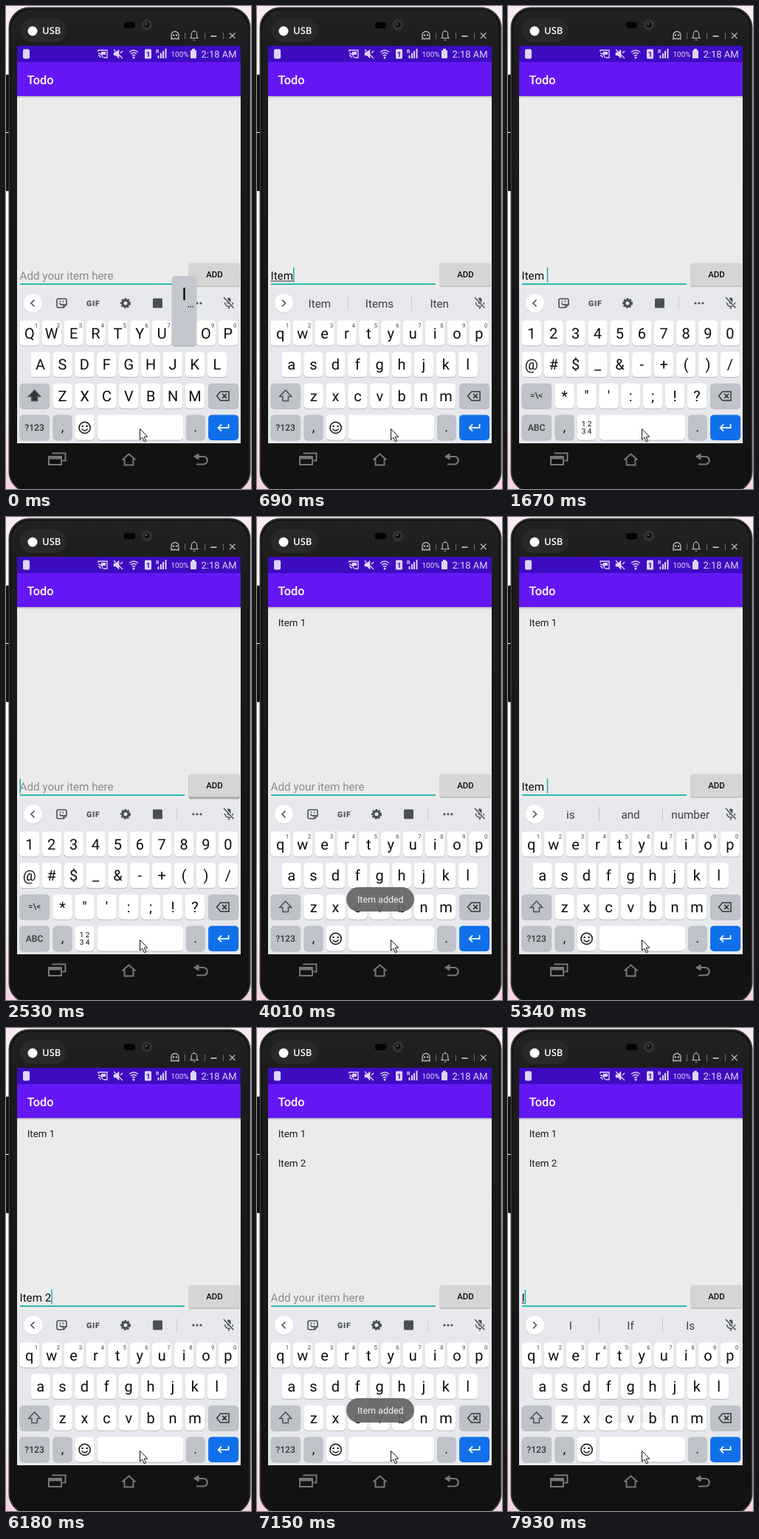
Animation, 332 px wide and 655 px high, one loop 8000 ms. Source, as an HTML page:

```html
<!DOCTYPE html>
<html lang="en">
<head>
<meta charset="utf-8">
<title>Todo</title>
<style>
  html, body { margin: 0; width: 100%; height: 100%; overflow: hidden; background: #fbf3f7; }
  svg { display: block; width: 332px; height: 655px; font-family: Roboto, "Noto Sans", sans-serif; }
  text { white-space: pre; text-rendering: geometricPrecision; }
</style>
</head>
<body>
<svg id="stage" viewBox="0 0 332 655">
  <defs>
    <linearGradient id="backdrop" x2="0" y2="1">
      <stop stop-color="#f9eaf1"/><stop offset=".2" stop-color="#fff"/>
      <stop offset=".75" stop-color="#fff"/><stop offset="1" stop-color="#f5d3e2"/>
    </linearGradient>
    <linearGradient id="shell" x2="0" y2="1">
      <stop stop-color="#222"/><stop offset=".08" stop-color="#1d1d1d"/>
      <stop offset=".5" stop-color="#181818"/><stop offset=".9" stop-color="#121212"/>
    </linearGradient>
    <linearGradient id="barShade" x2="0" y2="1">
      <stop stop-color="#aaa6bb"/><stop offset="1" stop-color="#ebebeb"/>
    </linearGradient>
  </defs>
  <g id="phone"></g>
  <g id="app"></g>
</svg>
<script>
const LOOP = 8000;
const INK = '#0c0d0e', GREY = '#4b4f55', DARK_KEY = '#bfc2c9', POPUP = '#c4c7ce', TEAL = '#12b3ab';
const PITCH = 29.9;

const rect = (x, y, w, h, fill, r = 0, extra = '') =>
  `<rect x="${x}" y="${y}" width="${w}" height="${h}" rx="${r}" fill="${fill}" ${extra}/>`;
const circle = (x, y, r, fill, extra = '') =>
  `<circle cx="${x}" cy="${y}" r="${r}" fill="${fill}" ${extra}/>`;
const line = (d, color, width = 1.5, fill = 'none') =>
  `<path d="${d}" fill="${fill}" stroke="${color}" stroke-width="${width}"/>`;
const escapeText = s => s.replace(/&/g, '&amp;').replace(/</g, '&lt;');
const text = (x, y, size, s, fill = INK, extra = '') =>
  `<text x="${x}" y="${y}" font-size="${size}" fill="${fill}" ${extra}>${escapeText(s)}</text>`;
const mid = (x, y, size, s, fill, extra = '') =>
  text(x, y, size, s, fill, `text-anchor="middle" ${extra}`);

const BOLD = 'font-weight="500"';

const LAYOUTS = {
  lower: ['qwertyuiop', 'asdfghjkl', 'zxcvbnm'],
  caps: ['QWERTYUIOP', 'ASDFGHJKL', 'ZXCVBNM'],
  symbols: ['1234567890', '@#$_&-+()/', '*"\':;!?']
};

// Each entry changes only the listed parts of the state before it.
const STEPS = [
  [0, { text: '', layout: 'caps', words: '', popup: 'I', caret: false, items: 0, toast: 0, space: false, press: false }],
  [120, { text: 'I', layout: 'lower', words: 'I If Is', popup: '', caret: true }],
  [260, { text: 'It', words: 'It Item Itna', popup: 'e' }],
  [390, { text: 'Ite', words: 'Ite Item Items', popup: '' }],
  [690, { text: 'Item', words: 'Item Items Iten' }],
  [810, { space: true }],
  [970, { text: 'Item ', words: 'is and number', space: false }],
  [1390, { caret: false }],
  [1670, { layout: 'symbols', words: '', caret: true }],
  [1820, { popup: '1' }],
  [1970, { text: 'Item 1', popup: '' }],
  [2530, { text: '', press: true }],
  [2670, { items: 1, toast: .3, press: false }],
  [2810, { layout: 'lower', toast: .7 }],
  [2940, { toast: 1 }],
  [3070, { caret: false }],
  [3450, { caret: true }],
  [4010, { caret: false }],
  [4130, { layout: 'caps', toast: .85 }],
  [4270, { popup: 'I', toast: .45 }],
  [4400, { text: 'I', layout: 'lower', words: 'I If Is', popup: '', caret: true, toast: .1 }],
  [4540, { popup: 't', toast: 0 }],
  [4670, { text: 'It', words: 'It Item Itna', popup: '' }],
  [4800, { popup: 'e' }],
  [4950, { text: 'Ite', words: 'Ite Item Items', popup: 'm' }],
  [5100, { text: 'Item', words: 'Item Items Iten', popup: '' }],
  [5220, { space: true }],
  [5340, { text: 'Item ', words: 'is and number', space: false }],
  [5470, { popup: 'w' }],
  [5870, { held: '2', caret: false }],
  [6180, { text: 'Item 2', words: '', popup: '', held: '', caret: true }],
  [6600, { text: '', press: true }],
  [6730, { items: 2, toast: .4, press: false }],
  [6870, { toast: .8 }],
  [7010, { toast: 1 }],
  [7150, { caret: false }],
  [7540, { layout: 'caps', toast: .8 }],
  [7670, { popup: 'I', toast: .5 }],
  [7800, { toast: .25 }],
  [7930, { text: 'I', layout: 'lower', words: 'I If Is', popup: '', caret: true, toast: .05 }]
];
let last = {};
const states = STEPS.map(([at, change]) => (last = { ...last, ...change, at }));

function windowIcons() {
  const c = '#bdbdbd';
  return line('M224 45V39.500a5 5 0 0 1 10 0V45l-1.700-1.200-1.600 1.200-1.700-1.200-1.700 1.200-1.600-1.200Z', c, 1.3)
    + circle(227, 39.500, 1.2, c) + circle(231, 39.500, 1.2, c)
    + line('M242.500 36v9M269.500 36v9M294.500 36v9', '#6a6a6a', 1)
    + line('M250 43.500h10l-1.300-2v-3.500a3.700 3.700 0 0 0-7.400 0v3.500ZM253.500 46h3M255 32.500v2', c, 1.1)
    + line('M277.500 41h8', c, 1.8) + line('M303 36.500l7.500 7.500M310.500 36.500l-7.500 7.500', c, 1.2);
}

function statusBar() {
  const c = '#ded5fa';
  return rect(15, 54, 303, 22, '#3d0cc1')
    + rect(23, 58.500, 9, 13, c, 2)
    + line('M125 62v-2h12v10h-5M125 64a6 6 0 0 1 6 6M125 67a3 3 0 0 1 3 3', c, 1.3) + rect(129, 62, 6, 4, c)
    + line('M146 63h3l4-4v12l-4-4h-3Z', c, .5, c) + line('M146 59l12 12M158 61l-3 3', c, 1.4)
    + line('M167 62.500q6-5 12 0M169 65q4-3.500 8 0M171 67.500q2-2 4 0', c, 1.4) + circle(173, 70, 1.5, c)
    + rect(188, 58.500, 9, 13, c, 1.5) + mid(192.500, 69, 10, '1', '#3d0cc1', 'font-weight="700"')
    + text(203, 64, 7, 'R', c, 'font-weight="700"') + line('M206.500 71v-4M210 71v-7M213 71V61M216.500 71V58', c, 2)
    + text(223.500, 69, 10, '100%', c) + rect(250, 60, 8, 11, c, 1) + rect(252, 58, 4, 2, c)
    + text(264.500, 69.700, 13, '2:18 AM', c);
}

function navIcons() {
  const c = '#777';
  return line('M62.500 606.500h18v10h-4M58 611h17v11h-17Z', c, 2) + line('M58 613h17', c, 3)
    + line('M157.500 615.500l9-8 9 8M160.500 614v8.500h12V614', c, 2)
    + line('M261 607v8l-6.500-4Z', c, 1, c) + line('M259 611h8.500a5 5 0 0 1 0 10.500H258', c, 2.2);
}

function phone() {
  return rect(0, 0, 332, 655, 'url(#backdrop)')
    + rect(0, 93, 6, 78, '#111', 1) + rect(0, 172, 6, 79, '#111', 1)
    + rect(4.500, 2.500, 326, 656, '#0d0d0d', 27, 'stroke="#343434" stroke-width="2"')
    + rect(7, 5, 321, 652, 'url(#shell)', 25)
    + rect(19, 17, 63, 32, '#292929', 16) + circle(36, 34, 6.5, '#fff')
    + text(49, 37.500, 13, 'USB', '#fff', 'font-weight="600" font-family="Open Sans, sans-serif"')
    + rect(159, 21, 17, 10, '#030303', 5, 'stroke="#262626"')
    + circle(191, 25.500, 6.5, '#2c2c2e', 'stroke="#444"') + circle(191, 25.500, 3, '#0a0a0a') + circle(190, 24.500, 1, '#99a')
    + windowIcons() + statusBar()
    + rect(15, 122, 303, 261, '#ebebeb') + rect(15, 122, 303, 3, 'url(#barShade)')
    + rect(15, 76, 303, 46, '#6417f4') + text(28.500, 105.700, 16.3, 'Todo', '#fff', BOLD)
    + rect(15, 383, 303, 210, '#e6e8ed')
    + navIcons();
}

function micOff() {
  return rect(299.500, 395.500, 5, 9, GREY, 2.5)
    + line('M296.500 402a5.500 5.500 0 0 0 11 0M302 407.500v3.500', GREY, 1.4)
    + line('M296 395l13 15', '#e6e8ed', 3) + line('M295 395l13.500 14.500', GREY, 1.5);
}

function toolbar() {
  const teeth = 'stroke-dasharray="2.600 1.590"';
  return line('M38.500 398.500l-4.500 4.500 4.500 4.500', GREY, 1.6)
    + line('M71 397h9q2 0 2 2v6l-4 4h-7q-2 0-2-2v-8q0-2 2-2ZM78 409v-4h4M72.500 403q2.500 4 5 1', GREY, 1.6)
    + circle(73.500, 400.500, 1, GREY) + circle(77.500, 400.500, 1, GREY)
    + mid(118.300, 406.500, 10.5, 'GIF', GREY, 'font-weight="900" letter-spacing=".8"')
    + circle(162, 403, 4, 'none', `stroke="${GREY}" stroke-width="3"`)
    + circle(162, 403, 5.8, 'none', `stroke="${GREY}" stroke-width="2.400" ${teeth}`)
    + rect(199, 396.500, 13, 13, GREY, 1.5)
    + line('M231.500 394v18', '#c9ccd2', 1)
    + [254, 259, 264].map(x => circle(x, 403, 1.6, GREY)).join('');
}

function suggestions(words) {
  return line('M34 398.500l4.500 4.500-4.500 4.500', GREY, 1.6)
    + line('M123.500 393v20M209.500 393v20', '#c3c6cc', 1)
    + words.split(' ').map((w, i) => mid(84.800 + 81.200 * i, 409, 15.2, w, '#3a3d42')).join('');
}

const key = (x, y, w, fill = '#fff') =>
  rect(x, y + 1, w, 34, '#b5b8c0', 5) + rect(x, y, w, 34, fill, 5);

function keyCenters(layout) {
  return LAYOUTS[layout].flatMap((row, r) => {
    const start = r === 2 ? 77 : row.length === 10 ? 32.200 : 47;
    return [...row].map((char, i) => ({ char, x: start + PITCH * i, y: 427 + 42.700 * r, hint: r ? '' : String((i + 1) % 10) }));
  });
}

function bottomRow(symbols, pressed) {
  const y = 555;
  return key(19, y, 40.500, DARK_KEY) + mid(39, 576.300, 12.2, symbols ? 'ABC' : '?123', '#33363b', BOLD)
    + key(64, y, 26, DARK_KEY) + mid(77, 578, 18, ',', INK)
    + key(94, y, 26)
    + (symbols
      ? mid(107, 570.500, 10, '1 2', INK) + mid(107, 580.500, 10, '3 4', INK)
      : circle(107, 572.500, 7.6, 'none', `stroke="${INK}" stroke-width="1.500"`)
        + circle(104, 570.500, 1.2, INK) + circle(110, 570.500, 1.2, INK) + line('M103 574q4 5 8 0', INK))
    + key(124, y, 116.500, pressed ? POPUP : '#fff')
    + key(244.500, y, 25.500, DARK_KEY) + mid(257, 578, 18, '.', INK)
    + rect(274.500, y, 41, 34.500, '#1070ea', 5)
    + line('M292.500 568l-4.500 4.500 4.500 4.500M288.500 572.500h13.500v-5', '#fff', 1.7);
}

function keyboard({ layout, space }) {
  const symbols = layout === 'symbols';
  const shift = line('M39 521.500l-8 8.500h4.200v6h7.600v-6H47Z', GREY, 1.5, layout === 'caps' ? '#33363b' : 'none');
  const keys = keyCenters(layout).map(k =>
    key(k.x - 13.200, k.y, 26.400)
    + mid(k.x, k.y + 24.200, 20, k.char, INK)
    + (symbols ? '' : mid(k.x + 9.300, k.y + 9.500, 8, k.hint, '#44474c'))).join('');
  return '<g transform="translate(-.4 -.6)">' + keys
    + key(19, 512.400, 40.500, DARK_KEY) + (symbols ? mid(39, 533, 11.5, '=\\<', '#33363b', BOLD) : shift)
    + key(274.500, 512.400, 41, DARK_KEY)
    + line('M286 529.500l5-6h11.500v12H291ZM293.500 526.500l6 6M299.500 526.500l-6 6', '#33363b', 1.5)
    + bottomRow(symbols, space) + '</g>';
}

function keyPopup({ popup, held, layout }) {
  if (!popup) return '';
  const k = keyCenters(layout).find(k => k.char === popup);
  const top = k.y - 61;
  return rect(k.x - 16.800, top + 1, 33.600, 95, '#aaadb4', 5)
    + rect(k.x - 16.500, top, 33, 95, POPUP, 5)
    + mid(k.x, top + 32.700, 24, held || popup, '#000')
    + (held ? '' : [5, 8, 11].map(dx => rect(k.x + dx, top + 41, 1.500, 1.500, '#222')).join(''));
}

function field(s) {
  return rect(19, 376.300, 223, 1.800, TEAL)
    + (s.text ? '' : text(18.500, 370.800, 15.2, 'Add your item here', '#8b8b8b'))
    + text(18.500, 370.800, 15.2, s.text, INK, 'id="entry"')
    + '<path id="composing" stroke="#222" stroke-width="1"/>'
    + (s.caret ? rect(0, 354.500, 1.500, 20, TEAL, 0, 'id="caret"') : '')
    + rect(247.500, 349.500, 69.500, s.press ? 33 : 31.500, s.press ? '#aaa' : '#bbb', 2)
    + rect(248, 348.500, 68.500, 31, '#d5d5d5', 2)
    + mid(282.500, 368.300, 11.5, 'ADD', INK, BOLD);
}

function toast(alpha) {
  return alpha ? `<g opacity="${alpha}">` + rect(121, 502, 92, 33, '#666', 16.5, 'opacity=".94"')
    + mid(167.300, 523, 12.5, 'Item added', '#f4f4f4') + '</g>' : '';
}

const pointer = line('M181.500 573.500v14.500l3.300-3 2.500 5.700 2.400-1-2.500-5.600h4.600Z', '#111', 1, '#fff');
const app = document.getElementById('app');
document.getElementById('phone').innerHTML = phone();
let shown;

function draw(time) {
  const s = states.findLast(state => state.at <= time);
  if (s === shown) return;
  shown = s;
  let items = '';
  for (let i = 0; i < s.items; i++) items += text(28.700, 147.800 + 40.500 * i, 13.3, `Item ${i + 1}`, '#1c1c1c');
  app.innerHTML = items + field(s) + circle(36.500, 403.500, 13, '#c9ccd2') + circle(36.500, 403, 12.8, '#fff')
    + (s.words ? suggestions(s.words) : toolbar()) + micOff()
    + keyboard(s) + keyPopup(s) + toast(s.toast) + pointer;

  const end = 18.5 + (s.text ? app.querySelector('#entry').getComputedTextLength() : 0);
  app.querySelector('#caret')?.setAttribute('x', end);
  if (s.words && !s.text.endsWith(' ')) app.querySelector('#composing').setAttribute('d', `M18.500 373H${end}`);
}

const start = performance.now();
function tick() {
  draw((performance.now() - start) % LOOP);
  requestAnimationFrame(tick);
}
tick();
</script>
</body>
</html>
```
